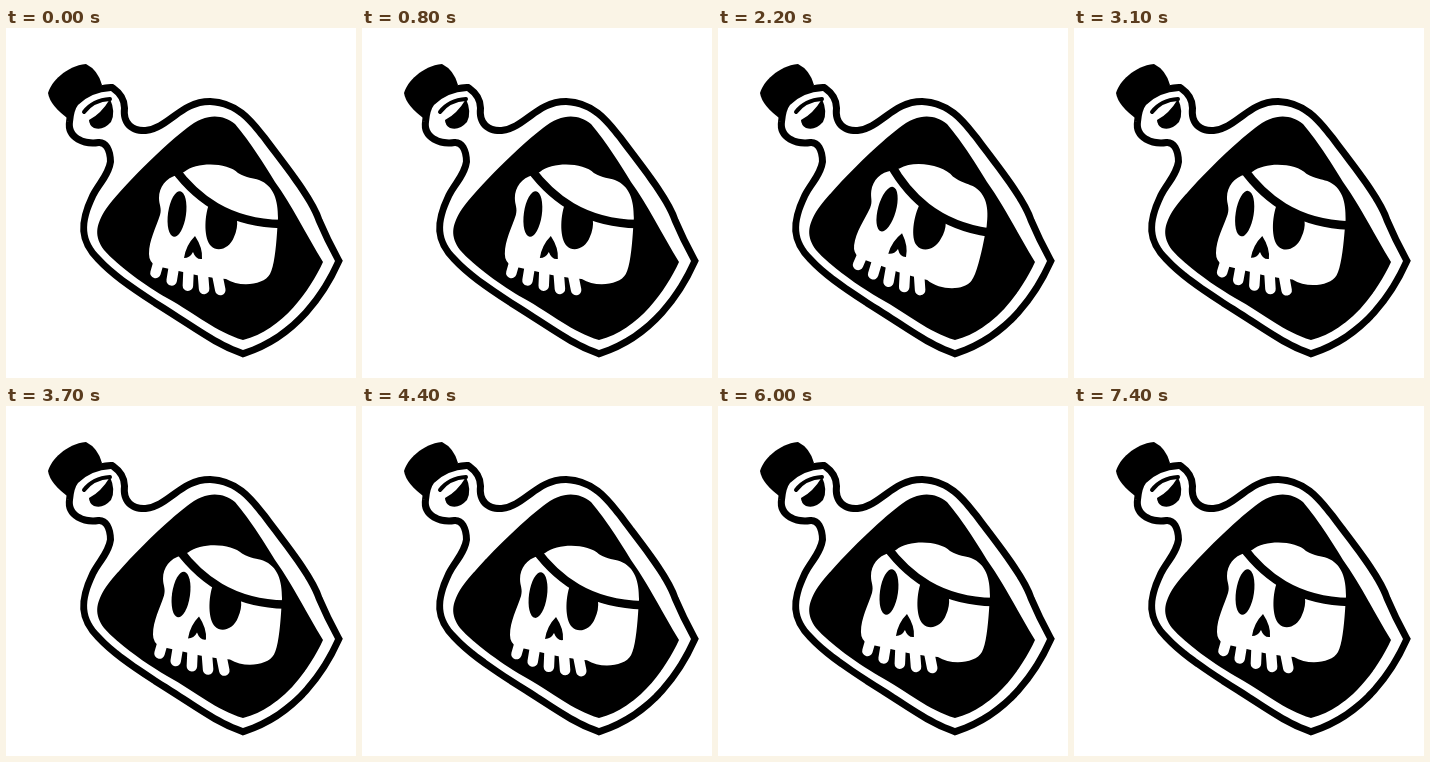
An HTML page that plays this animation: 350 px wide and 350 px high, repeating every 8 s.

```html
<!DOCTYPE html>
<html lang="en">
<head>
<meta charset="utf-8">
<title>Skull in a bottle</title>
<style>
html, body { margin: 0; width: 100%; height: 100%; overflow: hidden; background: #fff; }
svg { display: block; width: 100%; height: 100%; }
.white { fill: #fff; }
.line { fill: none; stroke: #000; stroke-linecap: round; }
.glass { fill: #fff; stroke: #000; stroke-width: 14; paint-order: stroke; }
#teeth { fill: none; stroke: #fff; stroke-width: 10.5; stroke-linecap: round; }
</style>
</head>
<body>
<svg viewBox="0 0 350 350">
  <!-- cork, glass, liquid -->
  <path d="M42 65 C45 54 60 38 80 36 Q92 42 96 57 L64 92 Q44 78 42 65Z"/>
  <path class="glass" d="M329 233 C316 262 288 306 237 322 C210 312 196 300 151 272 C125 255 108 243 95 229 C78 212 77 196 90 169 C97 156 106 148 108 134 C108 120 102 110 92 111 C79 113 65 107 67 94 Q68 82 72 77 Q85 64 105 63 Q115 70 115 80 C113 98 125 107 140 106 C165 103 176 77 204 77 C230 78 243 96 255 111 C275 138 303 172 310 194 Q318 213 329 233Z"/>
  <path d="M317 234 C304 262 277 302 237 312 C210 304 190 286 161 270 C140 258 112 238 98 222 C88 208 90 198 98 184 C108 168 150 124 181 100 C200 85 216 86 229 96 C245 115 258 136 269 154 C285 176 300 206 317 234Z"/>
  <path d="M83 92 Q95 86 104 71 Q110 84 105 94 Q97 103 88 100 Q83 97 83 92Z"/>
  <path class="line" stroke-width="4" d="M78 84 Q87 72 104 71"/>

  <g id="skull">
    <path class="white" d="M171 147 C160 150 153 159 153 170 C153 177 156 180 154 187 C150 200 143 212 143 226 Q143 234 150 238 Q173 243 190 247 Q206 250 220 251 C234 260 258 257 264 246 C268 239 270 220 271 205 L272 190 C272 172 268 158 253 152 C247 150 241 150 232 145 C222 135 192 133 178 144Z"/>
    <path id="teeth"/>
    <path class="line" stroke-width="8.5" d="M168 140 C190 170 222 195 275 196"/>
    <ellipse cx="171" cy="186" rx="9" ry="23" transform="rotate(8 171 186)"/>
    <path d="M203 176 C198 190 198 211 205 218 C212 225 224 220 228 209 Q232 200 231 192Z"/>
    <path d="M189 208 Q180 217 178 230 Q184 230 187 224 Q190 232 196 231 Q197 220 189 208Z"/>
  </g>
</svg>
<script>
const LOOP = 8000, STEP = 100, FIRST = 200, LAST = 7400;
const skull = document.getElementById("skull");

// Five teeth hang along a parabola and fan out slightly.
let teeth = "";
for (let i = 0; i < 5; i++) {
  const x = 149.5 + 16.2 * i;
  const y = 245 + 17 * (1 - (1 - i / 4) ** 2);
  const lean = 4 - 1.7 * i;
  teeth += `M${x + lean} ${y - 14}L${x} ${y}`;
}
document.getElementById("teeth").setAttribute("d", teeth);

// Smooth swell that peaks at the given time.
const swell = (t, peak, width) => Math.exp(-(((t - peak) / width) ** 2));

function pose(t) {
  if (t < FIRST || t >= LAST) return [0, 0, 0];
  const lean = swell(t, 2250, 600);
  const drift = swell(t, 4100, 600);
  const echo = swell(t, 5200, 400);
  return [
    6.5 * drift - 1.2 * swell(t, 2250, 1000) - echo,
    4 * drift - 0.5 * lean,
    7.5 * lean + 2 * echo
  ];
}

function draw(ms) {
  const t = Math.floor(ms % LOOP / STEP) * STEP;
  const [x, y, tilt] = pose(t);
  skull.setAttribute("transform", `translate(${x} ${y}) rotate(${tilt} 204 178)`);
}

const start = performance.now();
function tick() {
  draw(performance.now() - start);
  requestAnimationFrame(tick);
}
tick();
</script>
</body>
</html>
```
